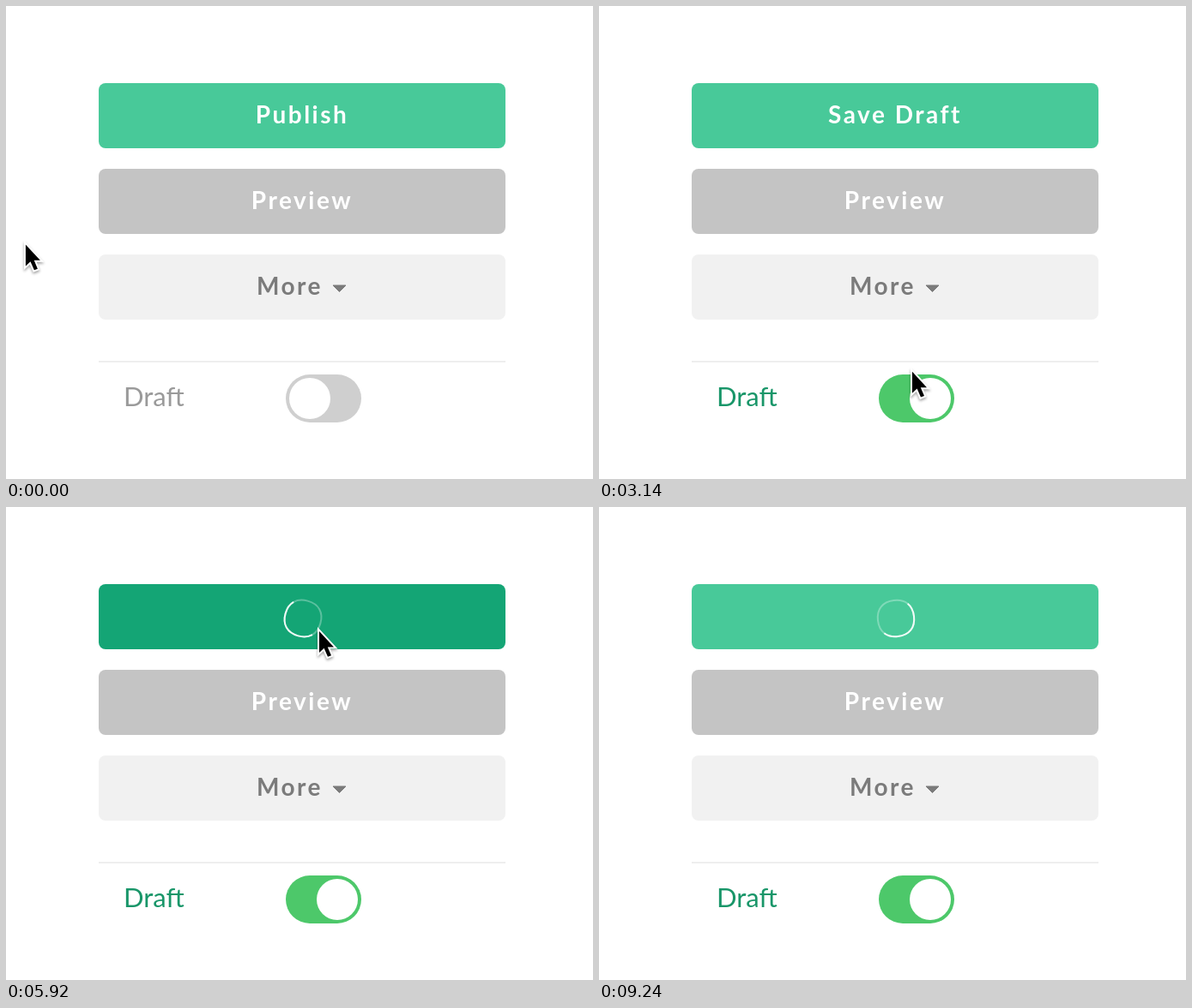
An HTML page for the animation above (9.26 s loop, 684 px wide and 552 px high).

```html
<!DOCTYPE html>
<html lang="en">
<head>
<meta charset="utf-8">
<title>Draft toggle</title>
<style>
  html, body { margin: 0; width: 100%; height: 100%; overflow: hidden; background: #fff; }
  svg { display: block; width: 684px; height: 552px; }
  text { font-family: Lato, "Open Sans", sans-serif; }
  .btn { font-size: 28px; font-weight: 700; letter-spacing: 2.5px; text-anchor: middle; fill: #fff; }
  .label { font-size: 31px; }
  #arrow, #hand { filter: drop-shadow(0 2px 1.5px rgba(0, 0, 0, .35)); }
</style>
</head>
<body>
<svg viewBox="0 0 684 552">
  <rect id="publish" x="108" y="90" width="474" height="76" rx="8"/>
  <rect id="preview" x="108" y="190" width="474" height="76" rx="8"/>
  <rect id="more" x="108" y="290" width="474" height="76" rx="8"/>
  <text id="title" class="btn" x="345" y="137"></text>
  <text class="btn" x="345" y="237">Preview</text>
  <text class="btn" x="330.5" y="336.5" style="fill:#7b7b7b">More</text>
  <path d="M381 326H396L388.5 333.5Z" fill="#7b7b7b" stroke="#7b7b7b" stroke-linejoin="round"/>
  <rect x="108" y="414" width="474" height="2" fill="#eee"/>
  <text id="label" class="label" x="137" y="466.5">Draft</text>
  <rect id="track" x="326" y="430" width="88" height="56" rx="28"/>
  <circle id="knob" cy="458" r="24" fill="#fff"/>
  <g id="spinner" fill="none" stroke="#fff" stroke-width="2">
    <path id="ring" stroke-opacity=".3"/>
    <path id="arc" stroke-opacity=".9"/>
  </g>
  <g id="cursor">
    <path id="arrow" d="M0 2V27L5.6 21.8L10 31.8L14 30.2L9.8 20.4H17Z"
      fill="#000" stroke="#fff" stroke-width="4" paint-order="stroke"/>
    <g id="hand" stroke="#000" stroke-width="2" stroke-linejoin="round" stroke-linecap="round">
      <path fill="#fff" d="M-2 5C-3.5 1 2 .5 3 4L5.5 11C6.5 8.5 10.5 8.5 11 11.5C12.5 9.5 16 10 16.5 13
        C18.5 11.5 21 13 20.5 16.5C20.5 22 19 25 17 28V32.5H3C1 28 -4 25 -7 20C-9 16.5 -5 15 -3 17.5L1 21Z"/>
      <path fill="none" stroke-width="1.6" d="M6 20V26.5M10.2 20V26.5M14.4 20V26.5"/>
    </g>
  </g>
</svg>
<script>
const LOOP = 9260;
const $ = id => document.getElementById(id);
const clamp = v => Math.min(1, Math.max(0, v));
const ramp = (t, start, length) => clamp((t - start) / length);
const ease = p => p * p * (3 - 2 * p);

// time, x, y of the pointer tip
const track = [
  [0, 23, 276], [200, 1, 370], [500, 110, 505], [700, 250, 518], [940, 355, 502],
  [1020, 356, 501], [1500, 365, 459], [2960, 365, 459], [3140, 365, 425],
  [3360, 365, 366], [3520, 365, 290], [3580, 365, 266], [3720, 365, 190],
  [3900, 365, 165], [4120, 365, 143], [6700, 365, 143], [6920, 300, 130],
  [7120, 73, 83], [7280, -60, 52], [LOOP, -60, 52]
];

// spans in which the pointer is a hand
const handSpans = [[1160, 3100], [3360, 3520], [3580, 3720], [3900, 4800]];

const slope = (i, k) => (track[i + 1][k] - track[i][k]) / (track[i + 1][0] - track[i][0]);

function tangent(i, k) {
  if (i === 0) return slope(0, k);
  if (i === track.length - 1) return 0;
  const a = slope(i - 1, k), b = slope(i, k);
  return a * b > 0 ? 2 * a * b / (a + b) : 0;
}

function pointer(t, k) {
  let i = 0;
  while (i < track.length - 2 && t >= track[i + 1][0]) i++;
  const [a, b] = [track[i], track[i + 1]];
  const span = b[0] - a[0], p = (t - a[0]) / span, q = 1 - p;
  return a[k] * (1 + 2 * p) * q * q + b[k] * p * p * (3 - 2 * p)
    + span * (tangent(i, k) * p * q * q - tangent(i + 1, k) * p * p * q);
}

function mix(a, b, p) {
  return `rgb(${a.map((v, i) => Math.round(v + (b[i] - v) * p))})`;
}

const hover = (t, on, off) => ease(ramp(t, on, 180)) - ease(ramp(t, off, 180));

// a slightly squared ring
const R = 22, H = R * 0.48;
const half = s => `C${-R * s} ${-H * s} ${-H * s} ${-R * s} 0 ${-R * s}`
  + `C${H * s} ${-R * s} ${R * s} ${-H * s} ${R * s} 0`;
$('arc').setAttribute('d', `M${-R} 0${half(1)}`);
$('ring').setAttribute('d', `M${R} 0${half(-1)}M${-R} 0${half(1)}`);

function draw(t) {
  $('publish').setAttribute('fill', mix([72, 201, 153], [20, 165, 117], hover(t, 3910, 7120)));
  $('preview').setAttribute('fill', mix([196, 196, 196], [176, 176, 176], hover(t, 3580, 3720)));
  $('more').setAttribute('fill', mix([241, 241, 241], [226, 226, 226], hover(t, 3360, 3520)));

  $('title').textContent = t < 2400 ? 'Publish' : 'Save Draft';
  $('title').setAttribute('opacity', 1 - ramp(t, 4800, 300));

  const on = ease(ramp(t, 2400, 400));
  $('label').setAttribute('fill', mix([154, 154, 154], [25, 150, 105], on));
  $('track').setAttribute('fill', mix([207, 207, 207], [77, 200, 106], on));
  $('knob').setAttribute('cx', 354 + 32 * on);

  $('spinner').setAttribute('opacity', ramp(t, 5200, 120));
  $('spinner').setAttribute('transform', `translate(346 130) rotate(${(t - 5320) / 900 * 360})`);

  const isHand = handSpans.some(([from, to]) => t >= from && t < to);
  $('hand').setAttribute('visibility', isHand ? 'visible' : 'hidden');
  $('arrow').setAttribute('visibility', isHand ? 'hidden' : 'visible');
  $('cursor').setAttribute('transform', `translate(${pointer(t, 1)} ${pointer(t, 2)})`);
}

const begin = performance.now();
function tick() {
  draw((performance.now() - begin) % LOOP);
  requestAnimationFrame(tick);
}
tick();
</script>
</body>
</html>
```
